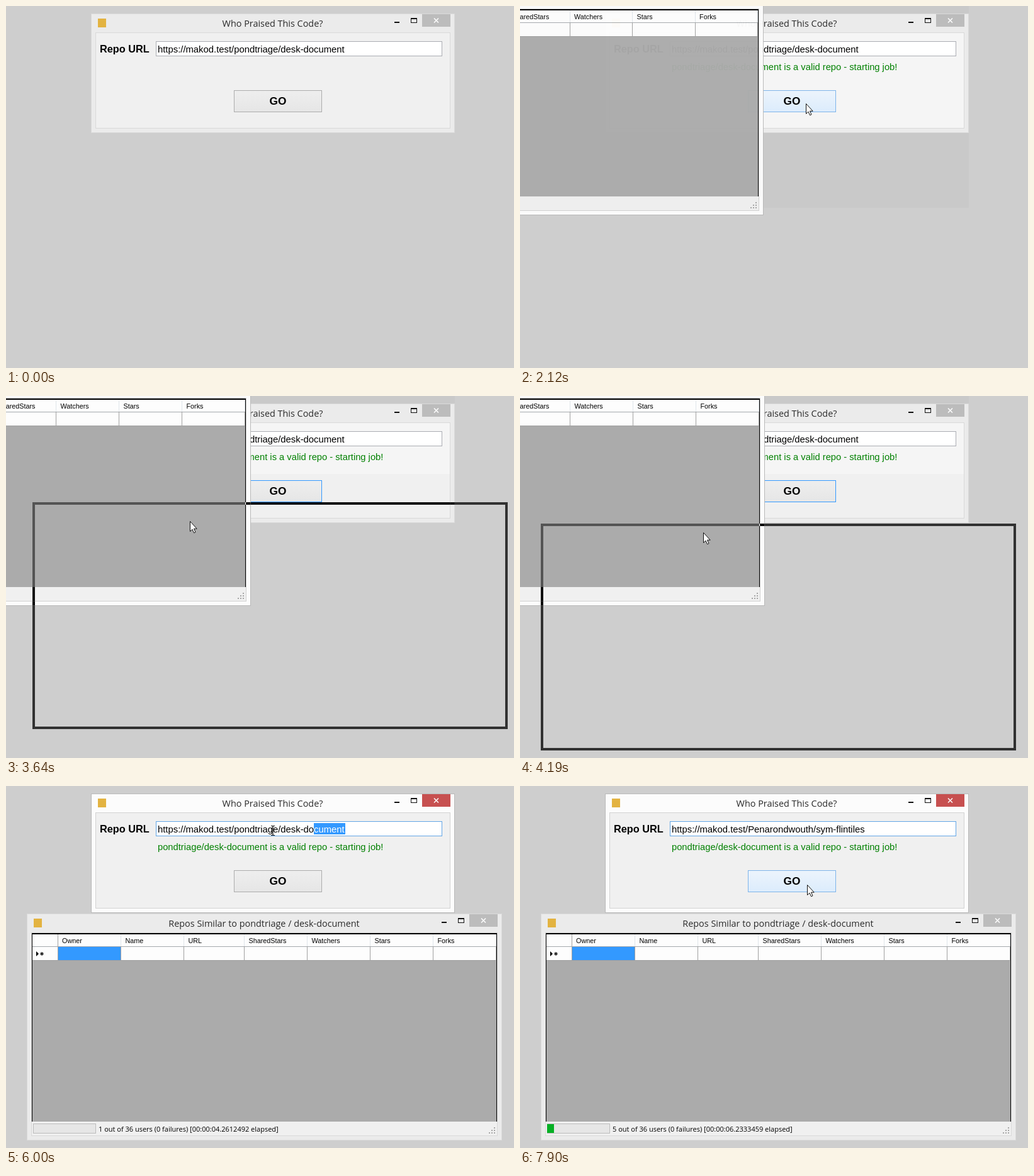
These frames come from a looping animation (807 px wide and 576 px high, 8 s). An HTML page:

```html
<!DOCTYPE html>
<html lang="en">
<head>
<meta charset="utf-8">
<title>Repository window demo</title>
<style>
  html, body { margin: 0; width: 100%; height: 100%; overflow: hidden; background: #cecece; }
  svg { display: block; width: 807px; height: 576px; }
  rect { shape-rendering: crispEdges; }
  text { white-space: pre; }
  .title { font: 14.4px "Open Sans", "Noto Sans", sans-serif; fill: #2b2b2b; text-anchor: middle; }
  .field { font: 14.84px "Liberation Sans", Arial, sans-serif; }
  .note { font: 14.72px "Liberation Sans", Arial, sans-serif; }
  .bold { font: bold 16.3px "Liberation Sans", Arial, sans-serif; }
  .go { font-size: 17.3px; text-anchor: middle; }
  .head { font: 10.8px "Liberation Sans", Arial, sans-serif; }
  .count { font: 11px "Open Sans", "Noto Sans", sans-serif; }
  .chrome { fill: #ebebeb; stroke: #dadada; }
  .client { fill: #f0f0f0; stroke: #d9d9d9; }
  .close { fill: #bcbcbc; }
  .active .chrome { fill: #fcfcfc; stroke: #b9b9b9; }
  .active .client { stroke: #d2d2d2; }
  .active .close { fill: #c75050; }
  .box { fill: #fff; stroke: #abadb3; }
  .box.hot { stroke: #63a6e6; }
  #button { fill: url(#plain); stroke: #acacac; }
  #button.focus { stroke: #3399ff; }
  #button.hover { fill: url(#hover); stroke: #7eb4ea; }
  #button.down { fill: url(#down); stroke: #569de5; }
  #outline { fill: none; stroke: #fff; stroke-width: 4; mix-blend-mode: difference; }
</style>
</head>
<body>
<svg id="stage" viewBox="0 0 807 576"></svg>
<script>
const LOOP = 8000, STEP = 150;
const REPO = 'pondtriage/desk-document';
const HOST = 'https://makod.test/';
const OLD_URL = HOST + REPO;
const NEW_URL = HOST + 'Penarondwouth/sym-flintiles';

const rect = (x, y, w, h, attrs = '') =>
  `<rect x="${x}" y="${y}" width="${w}" height="${h}" ${attrs}/>`;
const edged = (x, y, w, h, attrs) => rect(x + .5, y + .5, w - 1, h - 1, attrs);
const label = (x, y, cls, str, attrs = '') =>
  `<text x="${x}" y="${y}" class="${cls}" ${attrs}>${str}</text>`;
const line = (x1, y1, x2, y2, color) =>
  `<path d="M${x1} ${y1}L${x2} ${y2}" stroke="${color}" shape-rendering="crispEdges"/>`;
const gradient = (id, a, b) =>
  `<linearGradient id="${id}" x2="0" y2="1"><stop stop-color="${a}"/><stop offset="1" stop-color="${b}"/></linearGradient>`;

function frame(x, y, w, h, title, titleX) {
  return `<g transform="translate(${x} ${y})">
    ${edged(0, 0, w, h, 'class="chrome"')}
    ${edged(7, 30, w - 14, h - 37, 'class="client"')}
    ${rect(11, 8, 13, 14, 'fill="#e3b341"')}
    ${label(titleX, 21, 'title', title)}
    ${rect(w - 96, 13, 8, 2, 'fill="#111"')}
    ${edged(w - 70, 7, 10, 8, 'fill="none" stroke="#111"')}
    ${rect(w - 70, 7, 10, 2, 'fill="#111"')}
    ${rect(w - 52, 1, 45, 20, 'class="close"')}
    <path d="M${w - 33} 7.5l7 7m0-7l-7 7" stroke="#fff" stroke-width="1.5"/>
  </g>`;
}

function grid() {
  const edges = [82, 182, 282, 378, 478, 578, 678, 778];
  const names = ['Owner', 'Name', 'URL', 'SharedStars', 'Watchers', 'Stars', 'Forks'];
  let s = rect(41, 235, 739, 299, 'fill="#ababab"') + rect(42, 236, 737, 41, 'fill="#fdfdfd"');
  s += rect(83, 256, 99, 21, 'fill="#3399ff"');
  s += line(42, 255.5, 779, 255.5, '#a5a9ad') + line(42, 277.5, 779, 277.5, '#a0a0a0');
  edges.forEach((x, i) => {
    s += line(x + .5, 236, x + .5, 255, i ? '#dfe5ea' : '#a0a0a0');
    s += line(x + .5, 255, x + .5, 277, '#a0a0a0');
  });
  names.forEach((name, i) => s += label(edges[i] + (i ? 7.5 : 7), 250, 'head', name));
  s += '<path d="M48 263v8l4-4z"/><path d="M54 267h6M57 264v6M55 265l4 4m0-4l-4 4" stroke="#000"/>';
  s += line(41, 235, 780, 235, '#000" stroke-width="2');
  s += line(41.5, 235, 41.5, 534, '#000') + line(779.5, 235, 779.5, 534, '#000');
  for (let r = 0; r < 3; r++) {
    for (let c = 2 - r; c < 3; c++) s += rect(767 + c * 4, 543 + r * 4, 2, 2, 'fill="#a6a6a6"');
  }
  return s;
}

const stage = document.getElementById('stage');
stage.innerHTML = `
  <defs>
    ${gradient('plain', '#eeeeee', '#e6e6e6')}
    ${gradient('hover', '#ecf4fc', '#dcecfc')}
    ${gradient('down', '#daecfc', '#c4e0fc')}
  </defs>
  ${rect(0, 0, 807, 576, 'fill="#cecece"')}
  ${rect(380, 0, 333, 321, 'id="shade" fill="#c9c9c9"')}
  <g id="main">
    ${frame(135, 12, 578, 190, 'Who Praised This Code?', 288.5)}
    ${rect(143, 43, 562, 151, 'id="glow" fill="#f5f5f5"')}
    ${label(149, 74, 'bold', 'Repo URL')}
    ${edged(238, 56, 455, 24, 'id="box" class="box"')}
    ${rect(0, 59, 0, 18, 'id="mark" fill="#3399ff"')}
    <text x="241" y="74" class="field" id="url"><tspan></tspan><tspan fill="#fff"></tspan></text>
    ${label(241, 102, 'note', '', 'id="note"')}
    ${edged(362, 134, 140, 35, 'id="button"')}
    ${label(432, 157, 'bold go', 'GO')}
  </g>
  <g id="results">
    ${frame(33, 203, 755, 361, 'Repos Similar to ' + REPO.replace('/', ' / '), 377)}
    ${grid()}
    <g id="status">
      ${edged(43, 537, 100, 16, 'fill="#e6e6e6" stroke="#bcbcbc"')}
      ${rect(43, 538, 0, 14, 'id="bar" fill="#06b025"')}
      ${label(147, 550, 'count', '', 'id="count"')}
    </g>
  </g>
  ${rect(0, 0, 751, 357, 'id="outline"')}
  <g id="pointer">
    <path id="arrow" d="M.5.5V16.5L4 13.2 6.6 18.8 9 17.7 6.5 12.2H11.2Z" fill="#fff" stroke="#111"/>
    <path id="beam" d="M-3-7.5H-1L0-6.5 1-7.5H3M0-6.5V6.5M-3 7.5H-1L0 6.5 1 7.5H3" fill="none" stroke="#111" stroke-width="1.2"/>
  </g>`;

const $ = id => document.getElementById(id);
const set = (id, attrs) => { for (const k in attrs) $(id).setAttribute(k, attrs[k]); };
const show = (id, on) => set(id, { visibility: on ? 'visible' : 'hidden' });
const held = (list, t) => list.filter(k => k[0] <= t).pop();

// Pointer stops: time, x, y
const STOPS = [
  [0, -50, -50], [559, -50, -50], [560, 470, 5], [1310, 454, 155], [2400, 454, 155],
  [2810, -108, -13], [3369, -108, -13], [3370, 305, 161], [3490, 300, 183], [3640, 292, 199],
  [3760, 285, 214], [3910, 291, 217], [4680, 291, 217], [5760, 538, 72], [5880, 538, 72],
  [6000, 424, 71], [6120, 300, 72], [6270, 243, 73], [7100, 243, 73], [7780, 456, 157]
];
const DRAG = [[3370, 52, 124], [3490, 47, 147], [3640, 42, 169], [3760, 34, 185], [3910, 27, 200], [4190, 33, 203]];
// Time, scale and opacity while the second window opens
const OPENING = [[2000, .98, .6], [2120, .995, .97], [2270, 1, 1]];
// Time and index of the first selected character
const SELECTION = [[0, 99], [6000, 37], [6120, 23], [6270, 0], [6960, 99]];

function pointerAt(t) {
  const a = held(STOPS, t), b = STOPS[STOPS.indexOf(a) + 1];
  if (!b) return a.slice(1);
  const u = Math.floor((t - a[0]) / STEP) * STEP / (b[0] - a[0]);
  const p = u * u * (3 - 2 * u);
  return [1, 2].map(i => Math.round(a[i] + (b[i] - a[i]) * p));
}

function drawMain(t, x, y) {
  $('main').setAttribute('class', (t >= 1430 && t < 2000) || t >= 5880 ? 'active' : '');
  const overField = x > 238 && x < 693 && y > 56 && y < 80;
  const overButton = x > 361 && x < 502 && y > 133 && y < 169;
  const state = t >= 1570 && t < 1850 ? 'down' : overButton ? 'hover' : t >= 1570 && t < 5880 ? 'focus' : '';
  set('button', { class: state });
  set('box', { class: overField || t >= 5880 ? 'box hot' : 'box' });

  const url = t < 6960 ? OLD_URL : NEW_URL;
  const from = held(SELECTION, t)[1];
  const text = $('url');
  text.children[0].textContent = url.slice(0, from);
  text.children[1].textContent = url.slice(from);
  show('mark', from < url.length);
  if (from < url.length) {
    const left = text.getStartPositionOfChar(from).x;
    set('mark', { x: left, width: text.getEndPositionOfChar(url.length - 1).x + 1 - left });
  }

  $('note').textContent = t < 1850 ? '' : t < 2000 ? 'Validating ' + OLD_URL : REPO + ' is a valid repo - starting job!';
  set('note', { fill: t < 2000 ? '#ffd700' : '#008000' });

  const shaded = t >= 2000 && t < 4560;
  show('shade', shaded);
  show('glow', shaded);
  set('shade', { height: t < 3370 ? 321 : 124 });
  set('glow', { height: t < 3370 ? 151 : 81 });
  return overField;
}

function drawResults(t) {
  show('results', t >= 2000);
  set('results', { class: t < 5880 ? 'active' : '' });
  const [, scale, opacity] = held(OPENING, t) || OPENING[0];
  const place = t < 4560 ? 'translate(-399 -230) ' : '';
  set('results', { opacity, transform: `${place}translate(410.5 383.5) scale(${scale}) translate(-410.5 -383.5)` });

  const done = Math.floor((t - 5266) / 494);
  $('status').style.display = done < 0 ? 'none' : '';
  const elapsed = (4.2612492 + (done - 1) * .493024175).toFixed(7);
  $('count').textContent = `${done} out of 36 users (0 failures) [00:00:0${elapsed} elapsed]`;
  set('bar', { width: Math.max(0, done - 1) * 2.75 });

  const drag = t < 4560 && held(DRAG, t);
  show('outline', drag);
  if (drag) set('outline', { x: drag[1] + 2, y: drag[2] + 2 });
}

function draw(now) {
  const t = now % LOOP;
  const [x, y] = pointerAt(t);
  const overField = drawMain(t, x, y);
  drawResults(t);
  set('pointer', { transform: `translate(${x} ${y})` });
  show('arrow', !overField);
  show('beam', overField);
  requestAnimationFrame(() => draw(performance.now() - start));
}
const start = performance.now();
draw(0);
</script>
</body>
</html>
```
